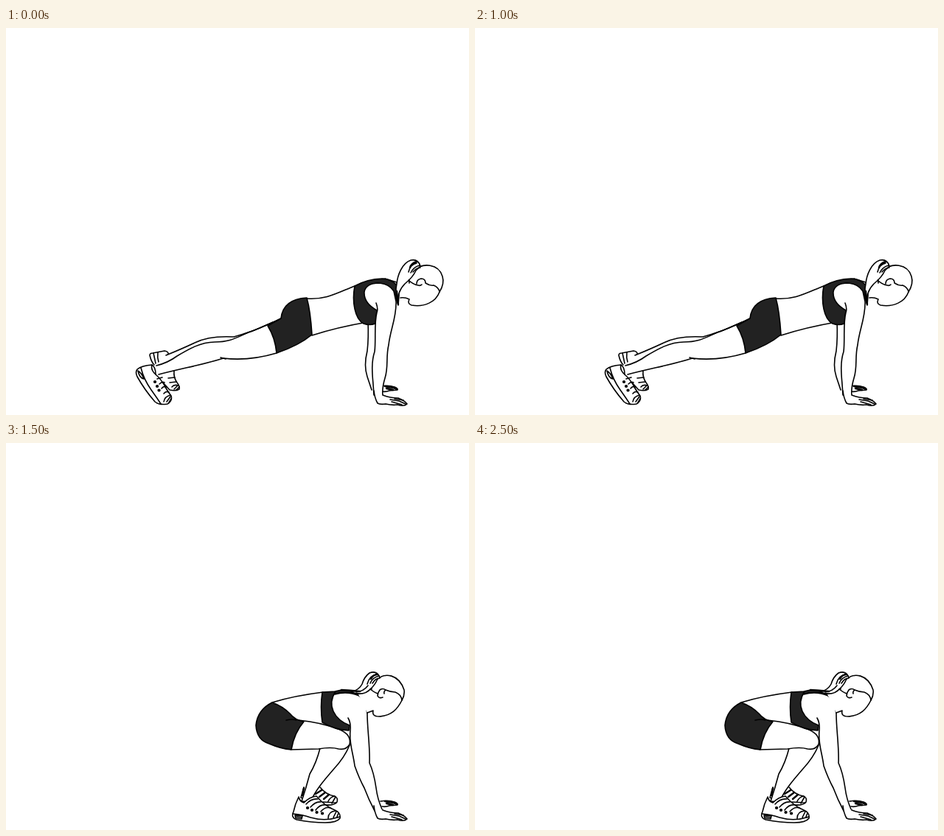
An HTML page for the animation above (3 s loop, 628 by 525 pixels).

```html
<!DOCTYPE html>
<html lang="en">
<head>
<meta charset="utf-8">
<title>Burpee</title>
<style>
html, body { margin: 0; width: 100%; height: 100%; overflow: hidden; background: #fff; }
svg { display: block; width: 100vw; height: 100vh; }
path { fill: none; stroke: #000; stroke-width: 1.6; stroke-linecap: round; stroke-linejoin: round; }
.w { fill: #fff; }
.f { fill: #fff; stroke: none; }
.k { fill: #222; }
.b { stroke-width: 2.4; }
.dots { stroke-width: 4.2; }
</style>
</head>
<body>
<svg viewBox="0 0 628 525">
<defs>
  <g id="hand">
    <path class="w" d="M499 492Q500 502 504 509Q507 511 515 510Q524 512 531 511Q540 514 544 510Q540 505 532 502Q521 502 511 498"/>
    <path d="M521 504L533 506L542 510M523 507L537 511M527 503L539 505"/>
  </g>
  <g id="farHand">
    <path class="w" d="M508 486Q519 484 527 487Q532 489 531 491L520 492Q515 494 510 493"/>
    <path class="b" d="M514 486L525 488L530 490M516 489L525 491"/>
  </g>
  <g id="farToe">
    <path class="w" d="M218 464L228 465Q227 474 232 481Q236 486 235 490Q230 493 222 491L213 481"/>
    <path d="M220 475L229 474M222 481L231 480M225 487Q228 483 234 485M228 490L233 485M231 491L235 487"/>
  </g>
  <g id="toe">
    <path d="M205 476L212 474M208 483Q212 479 215 481M211 489Q214 485 218 487M214 496Q217 492 221 494M214 507Q215 500 223 498M218 507L223 500M221 508L224 503"/>
    <path class="dots" d="M202 480h.1M205 486h.1M207.500 491.500h.1"/>
  </g>
</defs>

<g id="plank">
  <path class="w" d="M201 457Q197 453 195 444Q195 441 199 441L215 438Q221 439 220 443L216 453"/>
  <path d="M200 441L203 455M206 440Q205 447 207 453"/>
  <use href="#farToe"/>
  <path class="f" d="M217 444L256 427L309 419L356 402L367 441L295 448L207 470L204 457Z"/>
  <path d="M217 444Q239 435 256 427C272 419 291 418 309 419Q334 412 356 402L373 394M367 441C340 449 319 451 295 448C270 456 242 461 207 470"/>
  <path d="M204 458Q220 454 232 445C247 436 264 426 283 426C308 426 314 418 337 410L362 399M291 447L298 449"/>
  <path class="w" d="M178 463Q184 458 198 457Q203 460 203 470Q211 477 216 487Q220 494 224 499Q226 506 219 510Q208 512 202 507Q188 491 178 473Q175 467 178 463Z"/>
  <path d="M183 461Q187 477 197 491Q207 505 210 510M179 465Q184 468 187 476Q181 475 179 465M198 457Q196 464 203 470"/>
  <use href="#toe"/>
  <path class="f" d="M491 396L490 438L496 491L511 490L505 396Z"/>
  <path d="M491 398Q492 420 490 438Q485 458 490 473L496 491"/>
  <use href="#farHand"/>
  <path class="f" d="M408 367L473 350L512 340L532 347L529 375L490 402L415 417Z"/>
  <path d="M408 367C434 369 450 359 473 350M490 399Q449 406 415 417M514 340L530 345"/>
  <path class="k" d="M355 404L373 394C375 374 390 367 408 366Q413 384 415 416Q397 431 367 441Q365 420 355 404Z"/>
  <path class="f" d="M530 346L533 372L547 368L547 342Z"/>
  <path class="k" d="M473 350Q491 340 512 340Q523 341 530 349L533 363L532 376L526 357Q519 346 504 346Q488 347 486 358Q485 373 503 383L501 401Q493 404 485 401C473 395 469 371 473 350Z"/>
  <path class="w" d="M502 373Q505 381 503 386C499 402 502 423 500 439C495 454 497 471 498 483L499 498L511 499Q510 488 514 475C519 460 515 446 519 430C521 410 530 392 529 371L526 357"/>
  <use href="#hand"/>
  <path class="w" d="M535 366Q541 365 547 368Q544 374 550 376C567 379 583 372 588 358Q595 347 592 337C587 320 565 317 553 330Q545 337 547 346"/>
  <path class="w" d="M562 323Q559 313 549 315C537 319 531 336 530 347Q527 359 532 374Q530 358 541 347Q552 338 556 329Z"/>
  <path d="M546 331Q548 321 557 319M549 332Q553 324 561 322M552 331Q556 326 562 325"/>
  <path class="b" d="M530 357L532 375M548 325Q550 319 557 317"/>
  <path d="M546 342Q552 348 559 349Q562 350 564 348M557 347Q557 341 563 340Q569 340 569 346Q575 350 580 349Q587 352 588 358"/>
</g>

<g id="low">
  <path class="w" d="M207 456Q205 449 206 441Q209 439 215 440Q222 437 229 438Q232 441 229 444L226 454"/>
  <path d="M210 441L211 454M214 441L214 454"/>
  <use href="#farToe"/>
  <path class="f" d="M229 443L288 437L329 447L377 443L381 466L378 489L306 475L209 470L207 458Z"/>
  <path d="M229 443Q259 440 288 437C308 436 315 446 329 447Q352 446 377 443M378 489Q352 488 335 483Q318 476 306 475Q254 474 209 470"/>
  <path d="M208 458C237 456 261 449 285 447Q309 443 323 447M300 476Q306 474 310 477"/>
  <path class="w" d="M184 460Q190 456 205 456Q209 460 208 470Q212 477 216 487Q220 494 224 499Q226 506 219 510Q208 512 202 507Q194 490 184 471Q182 464 184 460Z"/>
  <path d="M190 458Q194 477 201 490Q208 505 211 510M186 460Q190 463 192 471Q187 470 186 460M205 456Q202 463 208 470"/>
  <use href="#toe" x="1"/>
  <path class="w" d="M491 441Q475 434 480 427Q484 423 501 430L525 436"/>
  <path class="f" d="M441 434L478 441L512 436L556 446L552 479L524 498L510 490L497 492L431 485Z"/>
  <path d="M441 434Q459 442 478 441Q490 442 497 440M431 485Q470 486 491 493"/>
  <path class="k" d="M376 443L393 443Q405 428 424 429Q435 430 441 435Q431 457 431 485Q405 492 377 489Q386 466 376 443Z"/>
  <path d="M387 446Q395 446 399 440Q405 434 412 433"/>
  <path class="k" d="M493 446Q500 438 516 436L531 436L556 446L555 462L550 450Q538 442 527 446Q510 449 493 446ZM491 484L497 485L500 498Q494 497 491 488Z"/>
  <path class="k" d="M510 475Q517 482 536 485Q528 489 522 498Q512 494 509 486Z"/>
  <path class="w" d="M552 448Q541 442 528 446Q515 450 500 448Q488 449 488 456Q488 467 492 477Q496 488 499 498L511 499Q507 484 511 474Q528 472 534 475Q546 479 553 472"/>
  <path d="M524 497Q534 488 549 482"/>
  <use href="#hand"/>
  <path class="f" d="M553 450L553 481L570 482L574 445Z"/>
  <path class="w" d="M555 481Q562 478 570 482Q566 488 573 490C589 493 604 489 611 479Q618 468 616 459C610 437 586 434 574 444Q567 451 567 457"/>
  <path class="w" d="M590 438Q586 429 575 431C560 434 554 446 552 456Q550 469 554 488Q555 472 560 462Q565 455 575 446Q581 440 590 438"/>
  <path d="M567 447Q574 437 585 433M571 446Q579 438 588 435"/>
  <path class="b" d="M553 471L554 487M575 439Q580 436 587 435"/>
  <path d="M567 457Q572 463 580 464Q584 466 586 463M579 462Q580 457 587 457Q594 458 593 465Q600 468 605 467Q611 470 611 479"/>
</g>

<g id="squat">
  <path class="w" d="M404 467L400 481L414 487L434 491Q445 492 449 487Q451 481 445 479Q434 477 426 467"/>
  <path class="b" d="M420 476L428 471M425 480L433 474M431 483L438 477M404 468L402 478"/>
  <path d="M437 486Q440 480 446 479M442 489L447 480M430 487L448 488"/>
  <use href="#farHand"/>
  <path class="f" d="M361 352L430 338L478 338L490 360L466 391L429 380L397 377Z"/>
  <path d="M361 352Q390 343 430 338"/>
  <path class="w" d="M426 414Q421 434 412 449Q407 468 401 486L413 487C419 472 431 458 444 443Q459 427 466 410"/>
  <path class="w" d="M397 376Q428 379 453 389Q469 396 466 409Q461 417 451 415Q441 412 424 415L386 416"/>
  <path class="k" d="M361 352Q341 362 339 383Q340 403 357 408Q373 415 387 416Q391 393 404 378Q392 376 385 367Q375 357 361 352Z"/>
  <path d="M380 376Q389 374 394 376"/>
  <path class="k" d="M429 338L447 337Q438 351 444 364Q450 377 466 383L465 390Q446 389 429 379Q426 358 429 338ZM446 337L455 335L480 336L482 342Q465 337 446 340Z"/>
  <path class="w" d="M464 373Q468 380 467 390C465 407 471 421 473 438Q479 455 486 468Q492 484 500 499L511 499Q504 484 502 468Q499 447 493 434C494 412 490 389 490 367Q488 351 479 343Q463 336 446 341"/>
  <use href="#hand"/>
  <path class="f" d="M478 341L490 366L498 363L500 330Z"/>
  <path class="w" d="M490 366L498 363Q496 371 506 371C523 370 531 361 537 349Q541 342 540 335C533 314 514 310 502 322Q495 327 496 334"/>
  <path class="w" d="M507 318Q503 308 493 312Q486 317 483 327Q479 335 468 338Q486 344 495 333Q500 329 504 320"/>
  <path d="M490 327Q493 315 503 314M494 326Q497 318 506 316M497 326Q501 319 507 319M475 338Q485 337 491 329"/>
  <path class="b" d="M455 335L480 337M495 320Q498 314 504 314"/>
  <path d="M494 334Q499 338 504 340M511 345Q506 347 504 343Q504 339 507 335Q511 332 515 335Q512 337 513 340M515 335Q522 338 528 338Q536 341 537 349"/>
  <path class="w" d="M397 480Q392 490 390 500Q386 508 394 511Q414 515 433 515Q449 515 453 509Q454 501 446 498Q433 493 421 479Q412 480 404 488Q398 486 397 480Z"/>
  <path d="M389 503Q402 504 413 508Q433 514 453 507M392 505L402 506L401 510L393 509ZM394 507L401 508M407 490Q414 482 423 483M413 494Q420 486 427 487M420 498Q426 490 433 491M427 500Q433 493 440 495M437 509Q437 500 447 499M444 508L448 500M449 507L451 502"/>
  <path class="dots" d="M409 495h.1M415 498h.1M421.500 501h.1M429 502.500h.1"/>
</g>

<g id="jump">
  <path class="w" d="M414 408Q403 415 400 419L401 426L438 445L446 454Q453 454 452 449Q444 439 440 427Q440 416 433 414"/>
  <path d="M403 417L405 426M407 414L408 423M436 417L438 425M440 436L447 446M445 451L451 447"/>
  <path class="w" d="M406 267Q412 295 414 318Q413 329 408 340C404 362 415 393 416 429L431 425Q433 418 431 407C431 391 437 374 434 338Q441 329 440 315Q446 292 447 264"/>
  <path d="M434 338L437 337"/>
  <path class="w" d="M396 427Q392 431 395 437Q413 450 425 464Q437 474 450 472Q455 467 449 459Q441 448 438 428Q435 420 430 421Q424 432 417 429Q410 418 407 419Z"/>
  <path d="M396 431Q413 440 426 456Q436 468 452 467M399 429L407 434M398 433L408 439M401 428L407 431M425 432Q430 426 436 428M427 439Q433 432 439 434M430 446Q436 439 441 441M434 453Q439 446 445 448M439 465Q441 457 449 459M446 470L451 463"/>
  <path class="b" d="M445 468L450 470L452 466"/>
  <path class="dots" d="M424 437h.1M427 444h.1M431 451h.1"/>
  <path class="w" d="M455 109L498 115L516 98Q510 110 509 119Q507 131 501 132Q485 132 466 127"/>
  <path class="w" d="M513 76Q499 73 493 64Q490 59 494 59Q499 61 503 65Q498 56 496 49Q497 44 501 47L506 57L517 65"/>
  <path d="M499 47Q503 42 505 48L507 57M494 60L501 68"/>
  <path class="f" d="M411 98L413 153L404 197L448 213L462 149L468 132L456 110L453 84L425 82Z"/>
  <path d="M425 82Q412 85 411 98Q410 125 413 153Q413 178 404 197M448 213L455 200Q457 174 462 149"/>
  <path class="k" d="M410 120Q428 131 445 121Q454 116 457 110Q464 117 468 126Q472 141 462 149Q439 143 413 153Q411 136 410 120Z"/>
  <path class="k" d="M404 197Q393 206 393 222Q394 240 403 246L406 267Q425 259 447 264Q447 246 443 231Q447 223 448 213Q438 211 427 203Q416 197 404 197Z"/>
  <path class="w" d="M411 98Q412 85 427 82Q448 81 465 90L494 94Q507 82 514 63Q503 54 503 47Q502 44 506 43L509 45Q503 36 508 34Q510 32 514 39Q511 31 517 32Q519 34 520 39Q519 31 524 34L527 43Q531 53 529 63Q521 83 510 104Q506 114 495 115Q475 115 456 110"/>
  <path d="M509 45L512 48M514 39L516 43M520 39L521 43M491 114L492 117M436 112Q440 107 448 108M440 110L442 113"/>
  <path class="w" d="M424 82Q429 76 428 66C420 52 423 30 441 25C458 24 471 33 471 50Q472 66 465 77Q462 83 453 82L451 84Q455 88 465 90"/>
  <path class="b" d="M420 83L430 82M453 83L460 83"/>
  <path d="M428 66Q437 67 438 62M446 48Q440 45 440 52Q436 57 438 62Q441 63 444 59M446 48Q449 53 452 49Q455 45 453 41Q458 39 468 41"/>
  <path class="w" d="M424 36Q413 31 402 38C386 48 384 70 373 88C391 84 407 79 416 66Q424 55 424 43"/>
  <path d="M421 40Q407 39 400 51M423 43Q412 43 407 53M376 85Q386 78 392 68M377 86Q394 80 401 69"/>
  <path class="b" d="M374 87L383 79M375 87L387 83M410 42Q416 38 422 40"/>
</g>
</svg>
<script>
const STEP = 500;
const order = ["plank", "low", "plank", "squat", "jump", "squat"];
const poses = ["plank", "low", "squat", "jump"].map(id => document.getElementById(id));

function draw(time) {
  const current = order[Math.floor(time / STEP) % order.length];
  for (const pose of poses) pose.style.display = pose.id === current ? "" : "none";
}

const start = performance.now();
function tick() {
  draw(performance.now() - start);
  requestAnimationFrame(tick);
}
tick();
</script>
</body>
</html>
```
